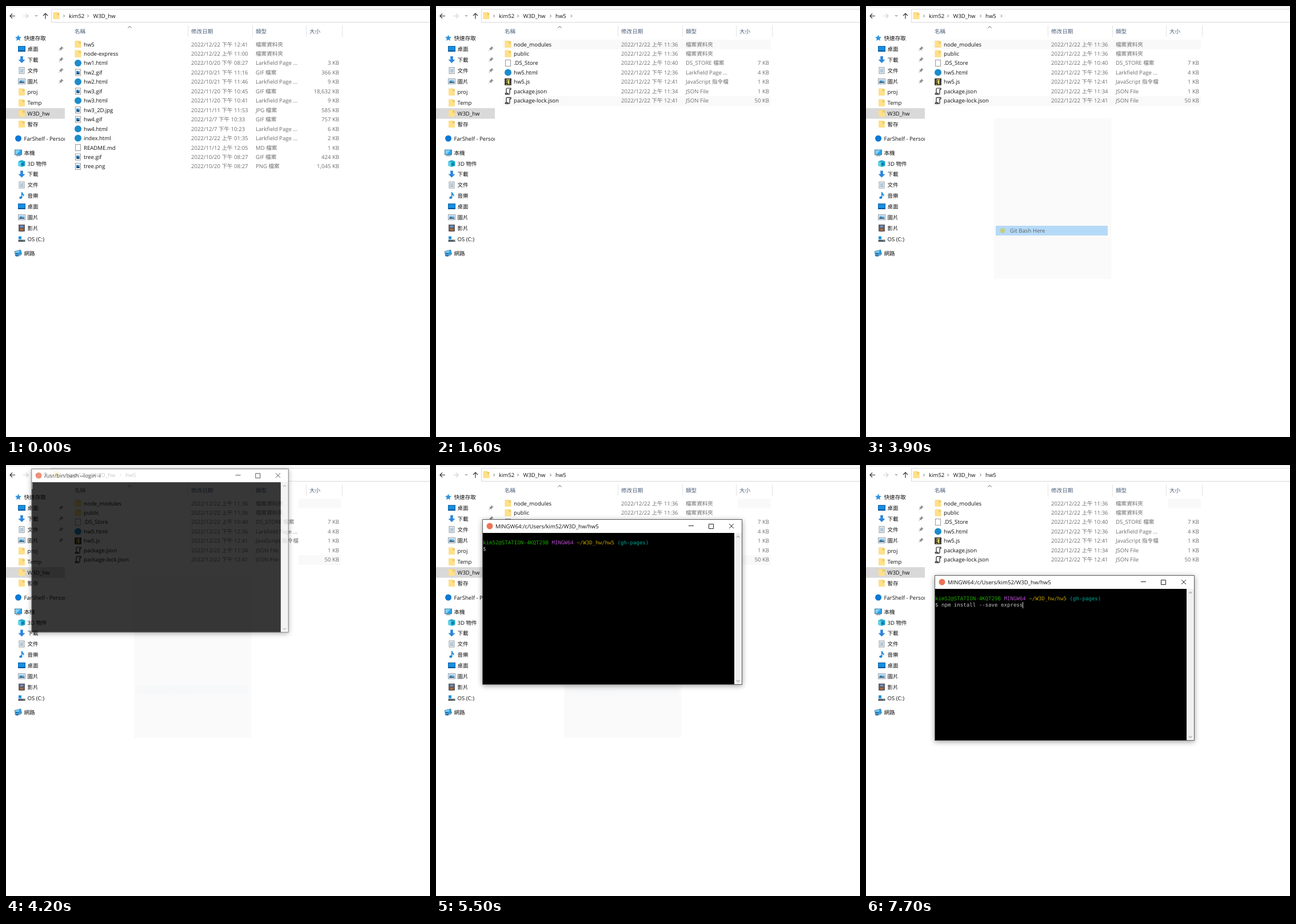
Write an HTML page that moves like this. It is 742x755 px and loops after 8000 ms.

```html
<!DOCTYPE html>
<html lang="zh-Hant">
<head>
<meta charset="utf-8">
<title>Folder and terminal</title>
<style>
  html, body { margin: 0; width: 100%; height: 100%; overflow: hidden; background: #fff; }
  svg { display: block; }
  text { font: 9.6px "Open Sans", "Noto Sans CJK TC", "Noto Sans CJK", sans-serif; text-rendering: geometricPrecision; white-space: pre; }
  .mono text { font: 9.1px "DejaVu Sans Mono", "Liberation Mono", monospace; }
  #frame { filter: drop-shadow(0 2px 5px rgba(0, 0, 0, .38)); }
</style>
</head>
<body>
<svg id="stage" width="742" height="755" viewBox="0 0 742 755"></svg>
<script>
const LOOP = 8000, USER = 'kim52', HOST = 'STATION-4KQT29B';
const PITCH = 9.1 * 0.602, ROW = 16.46;

const rect = (x, y, w, h, fill, more = '') =>
  `<rect x="${x}" y="${y}" width="${w}" height="${h}" fill="${fill}" ${more}/>`;
const line = (d, color, width = 1) =>
  `<path d="${d}" fill="none" stroke="${color}" stroke-width="${width}"/>`;
const shape = (d, fill) => `<path d="${d}" fill="${fill}"/>`;
const dot = (x, y, r, fill) => `<circle cx="${x}" cy="${y}" r="${r}" fill="${fill}"/>`;
// y is the middle of the text line
const text = (x, y, str, fill = '#111', more = '') =>
  `<text x="${x}" y="${y + 3.5}" fill="${fill}" ${more}>${str}</text>`;
const group = (id, body, more = '') => `<g id="${id}" ${more}>${body}</g>`;
const chevron = (x, y, color = '#555', s = 2) =>
  line(`M${x - s / 2} ${y - s}l${s} ${s}l${-s} ${s}`, color);

const page = rect(-4.5, -5.5, 9, 11, '#fff', 'stroke="#8d8d8d" stroke-width=".9"');
const scroll = fill => shape('M-3-5H5V-3H3V4Q3 6 1 6H-5Q-6 4-4 4H-3Z', fill) +
  line('M-3 4V-4Q-3-5.3-1.6-5.3H5V-3.2H3V3.6Q3 5.4 1 5.4H-4.5Q-5.6 4 -4 3.6H0V5', '#222', 1.2);
const monitor = rect(-6, -5, 12, 8.5, '#29a3e8', 'stroke="#44708f" stroke-width=".9"') +
  shape('M-5.4-4.4H4L-3 3H-5.4Z', '#7fd0f7') + rect(-4, 4.6, 8, 1.3, '#6f8796');
const icons = {
  folder: shape('M-5.3-6H2L3-5H5.3V6H-5.3Z', '#f1ca60') + shape('M-5.3-5.5H1.5V-1H5.3V6H-5.3Z', '#ffe08a'),
  web: dot(0, 0, 6, '#1c8ccb'),
  image: page + rect(-3, -2.5, 6, 5.5, '#2477b5') + shape('M-3 3L0 0 3 3Z', '#173f63') + dot(1.4, -1, .8, '#fff'),
  blank: page,
  json: scroll('#fff'),
  script: rect(-6, -6, 12, 12, '#4a4a42') + scroll('#f4e36d') + line('M1-3Q-2-3-1 0T-2 3', '#333', 1.2),
  star: shape('M0-5.5L1.6-1.9 5.5-1.5 2.6 1.1 3.4 5 0 3-3.4 5-2.6 1.1-5.5-1.5-1.6-1.9Z', '#2e94e2'),
  desktop: rect(-6, -4.5, 12, 9, '#168ee0', 'stroke="#0e5fa3"') + rect(-5.5, 3, 11, 1.2, '#0a4f90'),
  down: shape('M-2.3-6H2.3V0H6L0 6-6 0H-2.3Z', '#2c86dc'),
  doc: page + line('M-3-3H-1M0-3H3M-3-1H3M-3 1H3M-3 3H3', '#5487ae', .9),
  picture: rect(-6, -4.5, 12, 9, '#fff', 'stroke="#8a98a5"') + rect(-4.6, -3, 9.2, 6, '#8bcaf0') +
    shape('M-4.6 3V1L-1-1 2 1 4.6 0V3Z', '#366c90'),
  cube: shape('M0-6L6-4V4L0 6-6 4V-4Z', '#24a9cf') + shape('M-6-4L0-2V6L-6 4Z', '#60d2e6') +
    shape('M-1-1L4-2V3L-1 4Z', '#0d7fae'),
  note: shape('M-.6-6H1Q1-3.5 4-1.8 4.6 0 3 2 3-.8 1-1.6V3.6A2.6 2 0 1 1-.6 1.8Z', '#1688dc'),
  film: rect(-5.5, -6, 11, 12, '#3a3a3a') + rect(-3, -5, 6, 4.5, '#7690b6') + rect(-3, .5, 6, 4.5, '#a66c48') +
    line('M-4.3-5V6M4.3-5V6', '#ddd', '1" stroke-dasharray="1.2 1.2'),
  drive: rect(-6, 1.5, 12, 3.5, '#505963') + rect(3, 2.5, 1.5, 1.2, '#73e06c') + rect(-5.5, -4.5, 5, 5, '#1690df'),
  pc: monitor,
  network: `<g transform="rotate(-14) scale(.9)">${monitor}</g>` + dot(-2.5, 2.5, 3.3, '#2170ae') + line('M-5.5 2.5H.5', '#91d3f7', .8),
  cloud: dot(0, 0, 5.5, '#0f78d4')
};
const icon = (name, x, y) => `<g transform="translate(${x} ${y})">${icons[name]}</g>`;

const PAGE = ['web', 'Larkfield Page ...'], GIF = ['image', 'GIF 檔案'], DIR = ['folder', '檔案資料夾'];
const JSONF = ['json', 'JSON File'];
const parent = [
  ['hw5', '12/22 下午 12:41', DIR, ''], ['node-express', '12/22 上午 11:00', DIR, ''],
  ['hw1.html', '10/20 下午 08:27', PAGE, '3'], ['hw2.gif', '10/21 下午 11:16', GIF, '366'],
  ['hw2.html', '10/21 下午 11:46', PAGE, '9'], ['hw3.gif', '11/20 下午 10:45', GIF, '18,632'],
  ['hw3.html', '11/20 下午 10:41', PAGE, '9'], ['hw3_2D.jpg', '11/11 下午 11:53', ['image', 'JPG 檔案'], '585'],
  ['hw4.gif', '12/7 下午 10:33', GIF, '757'], ['hw4.html', '12/7 下午 10:23', PAGE, '6'],
  ['index.html', '12/22 上午 01:35', PAGE, '2'], ['README.md', '11/12 上午 12:05', ['blank', 'MD 檔案'], '1'],
  ['tree.gif', '10/20 下午 08:27', GIF, '424'], ['tree.png', '10/20 下午 08:27', ['image', 'PNG 檔案'], '1,045']
];
const child = [
  ['node_modules', '12/22 上午 11:36', DIR, ''], ['public', '12/22 上午 11:36', DIR, ''],
  ['.DS_Store', '12/22 上午 10:40', ['blank', 'DS_STORE 檔案'], '7'], ['hw5.html', '12/22 下午 12:36', PAGE, '4'],
  ['hw5.js', '12/22 下午 12:41', ['script', 'JavaScript 指令檔'], '1'],
  ['package.json', '12/22 上午 11:34', JSONF, '1'], ['package-lock.json', '12/22 下午 12:41', JSONF, '50']
];
const rowY = i => 67 + i * ROW;
const list = rows => rows.map(([name, date, [pic, type], size], i) => {
  const y = rowY(i), gray = '#6d6d6d';
  return icon(pic, 126, y) + text(136, y, name) + text(324, y, '2022/' + date, gray) + text(437, y, type, gray) +
    (size && text(583, y, size + ' KB', gray, 'text-anchor="end"'));
}).join('');

function sidebar() {
  const items = [
    [56, 'star', '快速存取', 1], [75, 'desktop', '桌面'], [94, 'down', '下載'], [113, 'doc', '文件'],
    [132, 'picture', '圖片'], [150.5, 'folder', 'proj'], [169.5, 'folder', 'Temp'], [188, 'folder', 'W3D_hw'],
    [207, 'folder', '暫存'], [232, 'cloud', 'FarShelf - Personal', 1], [257, 'pc', '本機', 1],
    [276, 'cube', '3D 物件'], [294.5, 'down', '下載'], [313.5, 'doc', '文件'], [332, 'note', '音樂'],
    [351, 'desktop', '桌面'], [370, 'picture', '圖片'], [389, 'film', '影片'], [408, 'drive', 'OS (C:)'],
    [433, 'network', '網路', 1]
  ];
  const pin = y => `<g transform="translate(96 ${y}) rotate(45)">` +
    shape('M-2.5-4H2.5V-3H1.7V0L3 1.5H-3L-1.7 0V-3H-2.5Z', '#8a8f94') + line('M0 1V5', '#8a8f94', .9) + '</g>';
  return '<clipPath id="side"><rect width="103" height="755"/></clipPath><g clip-path="url(#side)">' +
    rect(0, 179, 103, 18.5, '#d9d9d9') +
    items.map(([y, pic, str, root]) => icon(pic, root ? 21.5 : 27.5, y) + text(root ? 31.5 : 37.5, y, str)).join('') +
    [75, 94, 113, 132].map(pin).join('') + '</g>';
}

function toolbar() {
  const heads = [[120, '名稱'], [324, '修改日期'], [437, '類型'], [531, '大小']];
  return rect(0, 1, 742, 1, '#e3e3e3') +
    rect(79.5, 5.5, 670, 23, '#fff', 'stroke="#d9d9d9"') +
    line('M16 17.5H7M11 13.5L7 17.5 11 21.5', '#333', 1.2) +
    line('M30 17.5H39M35 13.5L39 17.5 35 21.5', '#d0d0d0', 1.2) +
    line('M51 16L53 18 55 16', '#666') +
    line('M69 22.5V13M65 17L69 13 73 17', '#444', 1.3) +
    icon('folder', 88, 17) +
    chevron(101.5, 17.5) + text(110, 17, USER) + chevron(143.5, 17.5) + text(152.5, 17, 'W3D_hw') +
    group('crumb', chevron(200.5, 17.5) + text(209, 17, 'hw5')) + group('crumbEnd', chevron(237, 17.5)) +
    heads.map(([x, str]) => text(x, 44, str, '#4c607a')).join('') +
    [318.5, 431.5, 525.5, 588.5].map(x => line(`M${x} 34V54`, '#e3e3e3')).join('') +
    line('M213.5 38.5L216.5 35.5 219.5 38.5', '#555');
}

function menu() {
  const items = [
    [210, '檢視(V)', 'sub'], [227, '排序方式(O)', 'sub'], [244.5, '分組方式(P)', 'sub'], [261.5, '重新整理(E)'],
    [284.5, '自訂此資料夾(F)...'], [307, '貼上(P)', 'off'], [324.5, '貼上捷徑(S)', 'off'], [342, '復原 刪除(U)'],
    [359, '使用 Marble Bureau 開啟(V)'], [376, 'Git GUI Here'], [393.5, 'Git Bash Here'],
    [416, '授與存取權給(G)', 'sub'], [439, '新增(W)', 'sub'], [461.5, '內容(R)']
  ];
  return rect(229, 202, 198, 274, '#9a9a9a') + rect(224, 197, 201.5, 277.5, '#f9f9f9') +
    group('menuBody',
      rect(224.5, 197.5, 201, 277, '#f2f2f2', 'stroke="#b5b5b5"') +
      group('pick', rect(227, 0, 196, 17, '#91c9f7')) +
      [273, 295.5, 404.5, 427.5, 450.5].map(y => line(`M233 ${y}H416`, '#aaa')).join('') +
      items.map(([y, str, kind]) => text(252, y, str, kind === 'off' ? '#7d7d7d' : '#111') +
        (kind === 'sub' ? chevron(413, y, '#333', 4.5) : '')).join('') +
      text(410, 342, 'Ctrl+Z', '#111', 'text-anchor="end"') +
      rect(234, 354, 10, 10, '#8661c5') + dot(239, 376, 4.5, '#a5b944') + dot(239, 393.5, 4.5, '#a5b944'));
}

function terminal() {
  const col = n => 1 + n * PITCH;
  const parts = [
    [0, USER + '@' + HOST, '#1ca800'], [22, 'MINGW64', '#b148c6'], [30, '~/W3D_hw/hw5', '#c0a000'], [43, '(gh-pages)', '#00a89a']
  ];
  return group('frame', rect(0, 0, 455, 290, '#5c5c5c') + rect(1, 1, 453, 23.5, '#fff')) +
    dot(13, 12, 5.5, '#ec7355') +
    text(23, 12, '', '#111', 'id="title"') +
    line('M361 11.5H370M396.5 8.5H404.5V16.5H396.5ZM432 8L440 16M440 8L432 16', '#222') +
    rect(1, 24, 440, 265, '#000') + rect(441, 24, 13, 265, '#f0f0f0') +
    line('M445 32L447.7 29.3 450.4 32M445 282L447.7 284.7 450.4 282', '#a6a6a6', 1.2) +
    '<g class="mono">' +
    group('prompt', parts.map(([c, str, fill]) => text(col(c), 40.7, str, fill)).join('') + text(1, 51.7, '$', '#bfbfbf')) +
    text(col(2), 51.7, '', '#bfbfbf', 'id="typed"') + '</g>' +
    rect(0, 47, 1, 11, '#d8d8d8', 'id="cursor"');
}

const stage = document.getElementById('stage');
stage.innerHTML = rect(0, 0, 742, 755, '#fff') + toolbar() + sidebar() +
  rect(512, 59, 74, 16.5, '#f9f9f9', 'id="stripeTop"') + rect(117, 158, 469, 17, '#f9f9f9', 'id="stripeLow"') +
  rect(117, 59, 469, 16.5, '#e5f3ff', 'id="hover"') +
  group('parent', list(parent)) + group('child', list(child)) +
  rect(224, 197, 205, 281, '#fafafa', 'id="haze"') +
  group('flash', rect(227, 385, 196, 17, '#91c9f7') + dot(239, 393.5, 4.5, '#a5b944') + text(252, 393.5, 'Git Bash Here')) +
  group('menu', menu()) + group('win', terminal());

const el = {};
stage.querySelectorAll('[id]').forEach(node => el[node.id] = node);
const set = (id, name, value) => el[id].setAttribute(name, value);
const show = (id, on) => set(id, 'display', on ? 'inline' : 'none');

// Each step holds from its time until the next one.
const hoverSteps = [[0, -1], [100, 0], [1200, 1], [1400, 3], [1500, 6], [1600, -1]];
const menuSteps = [[0, 0], [3000, .3], [3100, .7], [3200, 1]];
const pickSteps = [[0, 0], [3300, 261.5], [3400, 342], [3500, 376], [3600, 393.5]];
const flashSteps = [[0, 0], [3900, .65], [4000, .3], [4100, .02], [5700, 0]];
const openSteps = [[0, .9, 0], [4100, .95, .35], [4200, .99, .78], [4300, .996, .92], [4400, .999, .98], [4500, 1, 1]];
const dragSteps = [[0, 42, 5], [5200, 46, 10], [5300, 56, 27], [5400, 68, 58], [5500, 81, 95],
  [5600, 94, 131], [5700, 105, 161], [5800, 113, 181], [5900, 120, 193]];
const typeSteps = [[0, ''], [7500, 'node hw5.js'], [7700, 'npm install --save express']];
const blinkSteps = [[0, 1], [5200, 0], [5600, 1], [6100, 0], [6600, 1], [7100, 0], [7500, 1]];
const at = (steps, t) => steps.findLast(step => step[0] <= t).slice(1);

function draw(t) {
  const inside = t >= 800, ready = t >= 4700;
  show('parent', !inside);
  show('child', inside);
  show('crumb', inside);
  show('crumbEnd', t >= 1200 && t < 4200);

  const [row] = at(hoverSteps, t);
  show('hover', row >= 0);
  set('hover', 'y', rowY(row) - 8);
  const edge = t < 4200 ? 117 : t < 5300 ? 512 : 528;
  for (const id of ['stripeTop', 'stripeLow']) {
    set(id, 'x', edge);
    set(id, 'width', 586 - edge);
  }
  show('stripeTop', t >= 1600);
  show('stripeLow', t >= 1600 && t < 5600);

  const [pick] = at(pickSteps, t);
  show('menu', t >= 3000 && t < 3900);
  set('menuBody', 'opacity', at(menuSteps, t)[0]);
  show('pick', pick);
  set('pick', 'transform', `translate(0 ${pick - 8.5})`);
  show('haze', t >= 3900 && t < 5700);
  set('flash', 'opacity', at(flashSteps, t)[0]);

  const [scale, alpha] = at(openSteps, t), [x, y] = at(dragSteps, t), [typed] = at(typeSteps, t);
  show('win', alpha);
  set('win', 'opacity', alpha);
  set('win', 'transform', `translate(${x + 227.5 * (1 - scale)} ${y + 145 * (1 - scale)}) scale(${scale})`);
  el.title.textContent = ready ? `MINGW64:/c/Users/${USER}/W3D_hw/hw5` : '/usr/bin/bash --login -i';
  el.typed.textContent = typed;
  show('prompt', ready);
  show('cursor', at(blinkSteps, t)[0]);
  set('cursor', 'x', ready ? Math.round(1 + (2 + typed.length) * PITCH) : 1);
  set('cursor', 'y', ready ? 47 : 25);
}

const start = performance.now();
function tick() {
  draw((performance.now() - start) % LOOP);
  requestAnimationFrame(tick);
}
tick();
</script>
</body>
</html>
```
